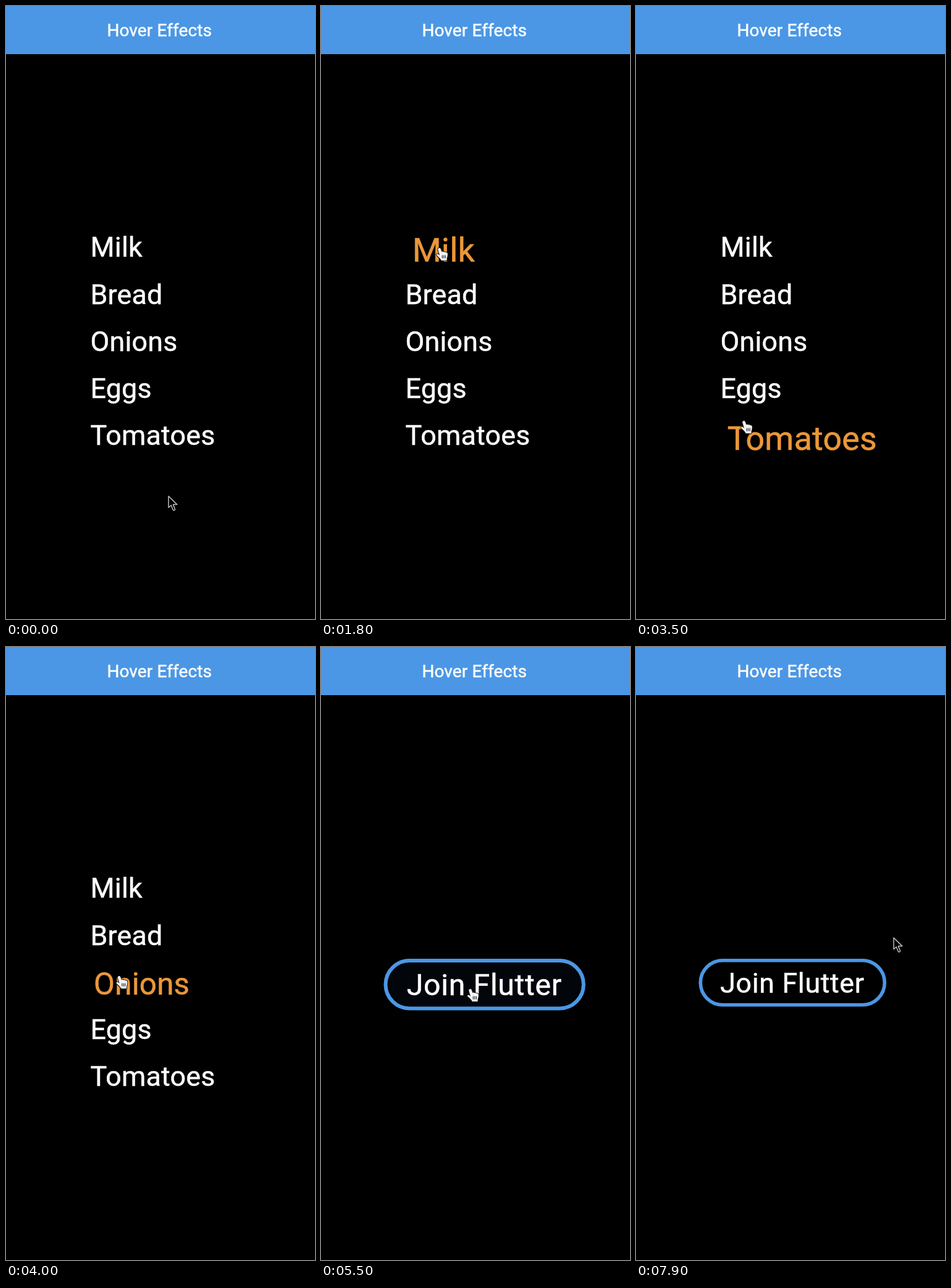
Write an HTML page that moves like this. It is 500x993 px and loops after 8 s.

```html
<!DOCTYPE html>
<html lang="en">
<head>
<meta charset="utf-8">
<title>Hover Effects</title>
<style>
  html, body { margin: 0; width: 100%; height: 100%; overflow: hidden; background: #000; }
  svg { display: block; width: 100%; height: 100%; }
  text {
    font: 44.8px Roboto, Arial, sans-serif; letter-spacing: .2px; color: #fff;
    fill: currentColor; stroke: currentColor; stroke-width: .5;
  }
  .title { font-size: 28px; letter-spacing: .1px; }
  #button text { letter-spacing: .65px; }
</style>
</head>
<body>
<svg viewBox="0 0 500 993">
  <rect width="500" height="993"/>
  <rect width="500" height="78" fill="#4b97e5"/>
  <text class="title" x="163.4" y="49.3">Hover Effects</text>
  <g id="list"></g>
  <g id="button">
    <rect id="pill" x="2.8" y="2.8" width="298" height="72" rx="36" stroke="#4b97e5" stroke-width="5.6"/>
    <text x="34.7" y="55">Join Flutter</text>
  </g>
  <path id="arrow" d="M1 1V19.5L5.2 15.8 8.3 23.2Q9 24.4 10.2 23.8 11.9 23.2 11.4 22L8.4 14.6H14.8Z" stroke="#bdbdbd" stroke-width="1.5" stroke-linejoin="round"/>
  <g id="hand" stroke="#111" stroke-linejoin="round" stroke-linecap="round">
    <path d="M4 1.5C5.5 .3 6.8 1 7.4 2.6L9.2 7.2C10 6.2 11.8 6.3 12.3 7.5 13.2 6.6 14.8 6.9 15.2 8.2 16.4 7.6 18 8.4 18.1 10 18.3 13 17.4 15 17 17L16.8 20.5H8.5C7 17.5 4.5 15.5 1.4 12.6 .2 11.2 1.8 9.5 3.4 10.6L5.8 12.3 3.2 3.6C3 2.6 3.2 2 4 1.5Z" fill="#f4f4f4" stroke-width="1.8" paint-order="stroke"/>
    <path d="M9.9 12.4V16.6M12.3 12.4V16.6M14.7 12.4V16.6" fill="none"/>
  </g>
</svg>
<script>
const LOOP = 8000, STEP = 100, CUT = 5000;
const FADE = 200, LAG = 40, TICK = 10; // hover timing in ms
const LEFT = 136.5, TOP = 366.3, PITCH = 76.2, ASCENT = 40, ROW = 52;
const BUTTON = { x: 101.5, y: 505, height: 77.5 };

// Pointer turning points: time, x, y
const listPath = [
  [100, 262, 793], [950, 187, 585], [1520, 186, 391], [1900, 186, 391],
  [2200, 182, 597], [2600, 174, 672], [3100, 169, 716], [3200, 169, 716],
  [3500, 169, 671], [4500, 186, 393]
];
const buttonPath = [
  [5000, 240, 620], [5300, 236, 553], [5750, 236, 553], [6050, 268, 478],
  [6450, 300, 545], [6900, 326, 466], [7400, 366, 540], [7800, 416, 470]
];

const $ = id => document.getElementById(id);
const clamp = v => Math.max(0, Math.min(1, v));
const move = (el, x, y, s = 1) => el.setAttribute('transform', `translate(${x} ${y}) scale(${s})`);
const show = (el, on) => el.setAttribute('display', on ? 'inline' : 'none');

const items = ['Milk', 'Bread', 'Onions', 'Eggs', 'Tomatoes'].map((label, i) => {
  const el = document.createElementNS('http://www.w3.org/2000/svg', 'text');
  el.setAttribute('y', ASCENT);
  el.textContent = label;
  $('list').append(el);
  return { el, top: TOP + PITCH * i, height: ROW, page: 'list' };
});
const button = { top: BUTTON.y, height: BUTTON.height, page: 'button' };
const targets = [...items, button];

const pageAt = t => t < CUT ? 'list' : 'button';

function pointerAt(t) {
  const path = pageAt(t) === 'list' ? listPath : buttonPath;
  const next = path.findIndex(k => k[0] > t);
  if (next < 1) return path.at(next).slice(1);
  const [t0, x0, y0] = path[next - 1], [t1, x1, y1] = path[next];
  const p = (t - t0) / (t1 - t0);
  return [x0 + (x1 - x0) * p, y0 + (y1 - y0) * p];
}

const within = (y, top, height) => y >= top && y < top + height;

// Replays the hover tweens from the start of the loop, so they depend on time alone
function hoverAt(end) {
  for (const target of targets) target.p = 0;
  for (let t = 0; t <= end; t += TICK) {
    const y = pointerAt(t - LAG)[1], page = pageAt(t - LAG);
    for (const target of targets) {
      target.over = target.page === page && within(y, target.top, target.height);
      target.p = clamp(target.p + (target.over ? TICK : -TICK) / FADE);
    }
  }
}

function draw(t) {
  const onList = pageAt(t) === 'list';
  show($('list'), onList);
  show($('button'), !onList);

  hoverAt(t);
  for (const { el, top, p, over } of items) {
    move(el, LEFT + 11.2 * p, top, 1 + .2 * p);
    el.style.color = over ? '#eb9839' : '#fff';
  }
  const p = button.p;
  move($('button'), BUTTON.x, BUTTON.y, 1 + .075 * p);
  $('pill').setAttribute('fill', `rgb(${2 * p}, ${5 * p}, ${10 * p})`);

  const [x, y] = pointerAt(t);
  const pointing = onList
    ? within(y, TOP, PITCH * 4 + ROW)
    : within(y, button.top, button.height);
  show($('hand'), pointing);
  show($('arrow'), !pointing);
  move($('hand'), x, y, 1.04);
  move($('arrow'), x, y);
}

const start = performance.now();
function tick() {
  const t = (performance.now() - start) % LOOP;
  draw(Math.floor(t / STEP) * STEP); // ten poses a second
  requestAnimationFrame(tick);
}
tick();
</script>
</body>
</html>
```
